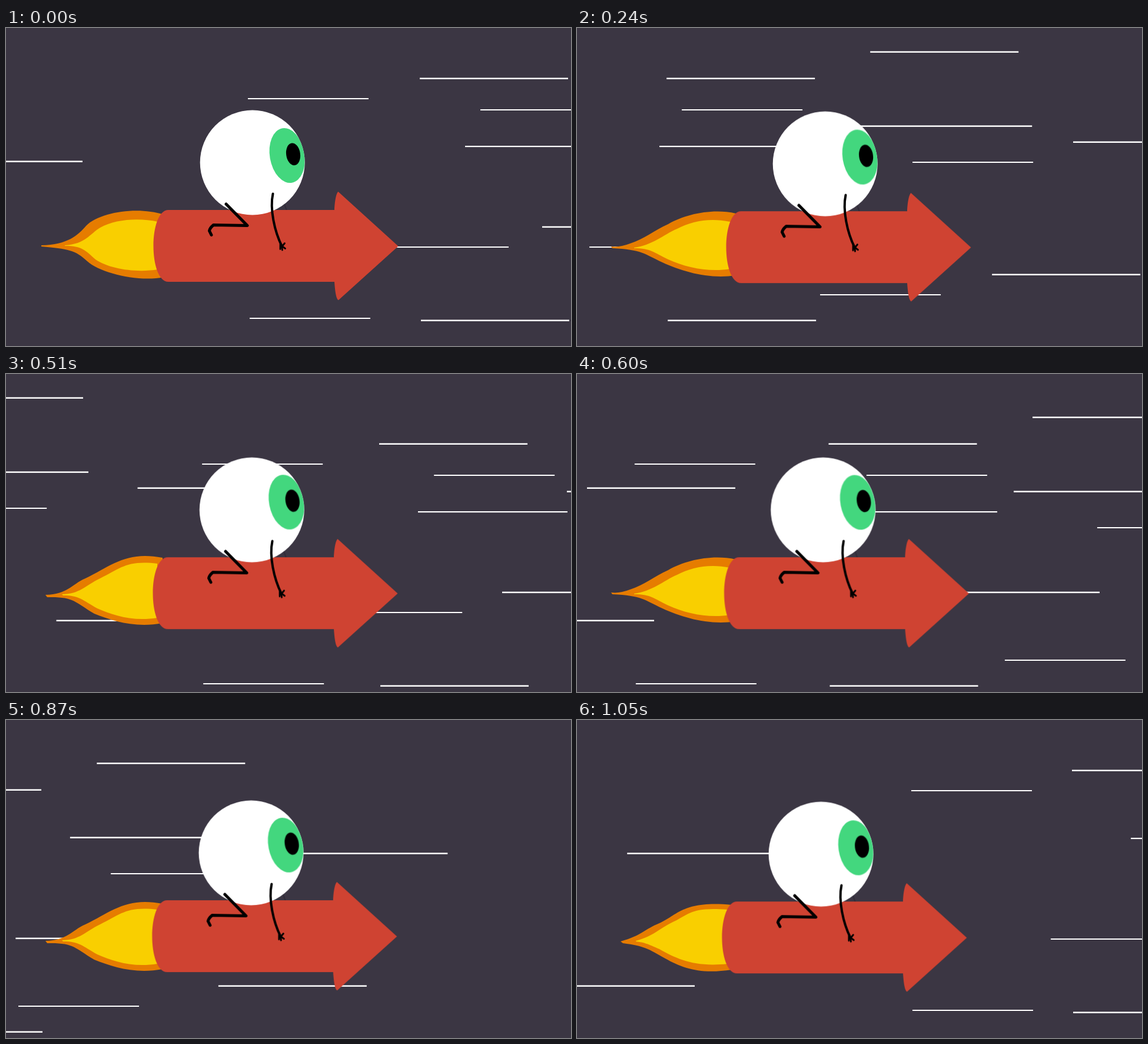
These frames come from a looping animation (960x540 px, 1.08 s). An HTML page without scripts:

```html
<!DOCTYPE html>
<html lang="en">
<head>
<meta charset="utf-8">
<title>Rocket ride</title>
<style>
html, body { margin: 0; width: 100%; height: 100%; overflow: hidden; background: #3b3643; }
svg { display: block; width: 960px; height: 540px; }

/* Speed lines: --x is the start, --v the travel per 30 ms step */
.lines rect {
  fill: #fff;
  width: var(--w);
  height: var(--h);
  animation: fly 1080ms steps(36) infinite;
}
.long { --w: 252px; --h: 2.5px; --v: 68.85; }
.wide { --w: 312px; --h: 2.5px; --v: 70.35; }
.short { --w: 205px; --h: 2px; --v: 78.43; }
.mid { --w: 254px; --h: 2.2px; --v: 80; }
@keyframes fly {
  from { transform: translateX(calc(var(--x) * 1px)); }
  to { transform: translateX(calc((var(--x) - 36 * var(--v)) * 1px)); }
}

/* Four flame drawings, 90 ms each */
.flame { fill: #e67c00; visibility: hidden; animation: flick 360ms step-end infinite; }
.flame .core { fill: #f9cf00; }
.flame:nth-child(2) { animation-delay: -270ms; }
.flame:nth-child(3) { animation-delay: -180ms; }
.flame:nth-child(4) { animation-delay: -90ms; }
@keyframes flick {
  0% { visibility: visible; }
  25%, 100% { visibility: hidden; }
}

.rider { animation: sway 1080ms ease-in-out infinite; }
@keyframes sway {
  0%, 1.39%, 100% { transform: translate(0, 0); }
  23.61% { transform: translate(3px, 2.2px); }
  37.5% { transform: translate(-1.4px, 2.2px); }
  56.94% { transform: translate(-.5px, 2.2px); }
  70.83% { transform: translate(-3px, 0); }
  81.94% { transform: translate(-2.2px, -3px); }
  98.61% { transform: translate(-4.2px, -.7px); }
}
.look { transform-origin: 418.7px 228.5px; animation: look 1080ms ease-in-out infinite; }
@keyframes look {
  0%, 1.39%, 100% { transform: rotate(0deg); }
  23.61% { transform: rotate(.5deg); }
  37.5% { transform: rotate(-1.6deg); }
  56.94% { transform: rotate(-.7deg); }
  70.83% { transform: rotate(-.5deg); }
  81.94% { transform: rotate(-1.2deg); }
  98.61% { transform: rotate(1.2deg); }
}
.limb { fill: none; stroke: #000; stroke-linecap: round; stroke-linejoin: round; }
</style>
</head>
<body>
<svg viewBox="0 0 960 540">
  <defs>
    <clipPath id="ball"><circle cx="418.7" cy="228.5" r="89"/></clipPath>
  </defs>

  <g class="lines">
    <g class="long">
      <rect y="39.4" style="--x:1049"/>
      <rect y="72.4" style="--x:2151"/>
      <rect y="84.5" style="--x:703"/>
      <rect y="84.5" style="--x:3250.5"/>
      <rect y="117.5" style="--x:1804.5"/>
      <rect y="192.5" style="--x:1394"/>
      <rect y="225.4" style="--x:-122"/>
      <rect y="225.4" style="--x:2495"/>
      <rect y="336.6" style="--x:911"/>
      <rect y="369.6" style="--x:2013"/>
      <rect y="417.5" style="--x:1256"/>
      <rect y="450.4" style="--x:2357.5"/>
      <rect y="495.4" style="--x:705"/>
      <rect y="495.4" style="--x:3252.5"/>
      <rect y="528.4" style="--x:1806.5"/>
    </g>
    <g class="wide">
      <rect y="165.4" style="--x:1024"/>
      <rect y="198.4" style="--x:2149"/>
    </g>
    <g class="mid">
      <rect y="200" style="--x:780"/>
      <rect y="200" style="--x:3741"/>
      <rect y="233" style="--x:2060"/>
    </g>
    <g class="short">
      <rect y="119" style="--x:411"/>
      <rect y="119" style="--x:3313"/>
      <rect y="138" style="--x:805.5"/>
      <rect y="152" style="--x:1666.5"/>
      <rect y="171" style="--x:2060.5"/>
      <rect y="227" style="--x:1197.5"/>
      <rect y="260" style="--x:2452.5"/>
      <rect y="371" style="--x:648.5"/>
      <rect y="371" style="--x:3550"/>
      <rect y="404" style="--x:1903.5"/>
      <rect y="452" style="--x:1040.5"/>
      <rect y="485" style="--x:2295.5"/>
      <rect y="492" style="--x:413.5"/>
      <rect y="492" style="--x:3315"/>
      <rect y="525" style="--x:1668.5"/>
    </g>
  </g>

  <g>
    <g class="flame">
      <path d="M60 369C105 368 122 352 136 336C160 312 225 303 268 317V423C225 432 160 416 138 396C118 377 105 375 60 371Z"/>
      <path class="core" d="M100 369C135 367 143 349 160 339C185 325 225 322 258 329V410C220 416 175 409 152 393C135 378 130 370 100 370Z"/>
    </g>
    <g class="flame">
      <path d="M67 375C105 374 110 358 135 347C180 325 205 300 266 312V423C220 432 180 419 150 407C115 386 115 378 70 379Z"/>
      <path class="core" d="M95 374C125 374 135 359 160 347C195 330 205 316 257 322V414C215 421 180 409 155 398C130 384 125 376 97 376Z"/>
    </g>
    <g class="flame">
      <path d="M58 371Q72 373 90 366C115 358 130 344 155 333C185 316 230 306 270 315V420C225 427 180 414 145 398C115 384 110 376 60 374Z"/>
      <path class="core" d="M97 373C130 368 145 352 170 341C195 328 225 322 260 329V409C225 415 185 407 155 393C130 381 125 374 97 374Z"/>
    </g>
    <g class="flame">
      <path d="M74 376C110 366 115 355 140 345C170 332 180 306 263 314V424C210 432 180 422 150 405C120 388 115 384 78 379Z"/>
      <path class="core" d="M100 375C130 367 140 354 165 342C190 330 195 317 256 322V414C200 420 170 406 140 389C120 380 115 378 100 376Z"/>
    </g>
  </g>

  <g class="rider">
    <path d="M473 299L477 310" stroke="#312c39" stroke-width="2"/>
    <path fill="#cf4332" d="M276 309H558C558.5 295 561 280 564.5 278L666.5 370.5L565 462C561 461 559 446 558 431H276C242 431 242 309 276 309Z"/>
    <circle cx="418.7" cy="228.5" r="89" fill="#fff"/>
    <g clip-path="url(#ball)">
      <g class="look">
        <ellipse rx="29.5" ry="46.9" fill="#43d77e" transform="translate(477.7 216.5) rotate(-10)"/>
        <ellipse rx="11.9" ry="19" fill="#000" transform="translate(488 214.3) rotate(-8)"/>
      </g>
    </g>
    <g class="limb">
      <path stroke-width="5" d="M374 299L410 335.5L352.5 334.5Q346 340 345.5 344.5L349 351.5"/>
      <path stroke-width="4" d="M453.5 281.5C448 307 456 345 469 371"/>
      <path stroke-width="2.8" d="M469 371L473.5 365.5M466 367V375.5M467 369L474.5 374.5M468.5 370L469.5 377"/>
    </g>
  </g>
</svg>
</body>
</html>
```
